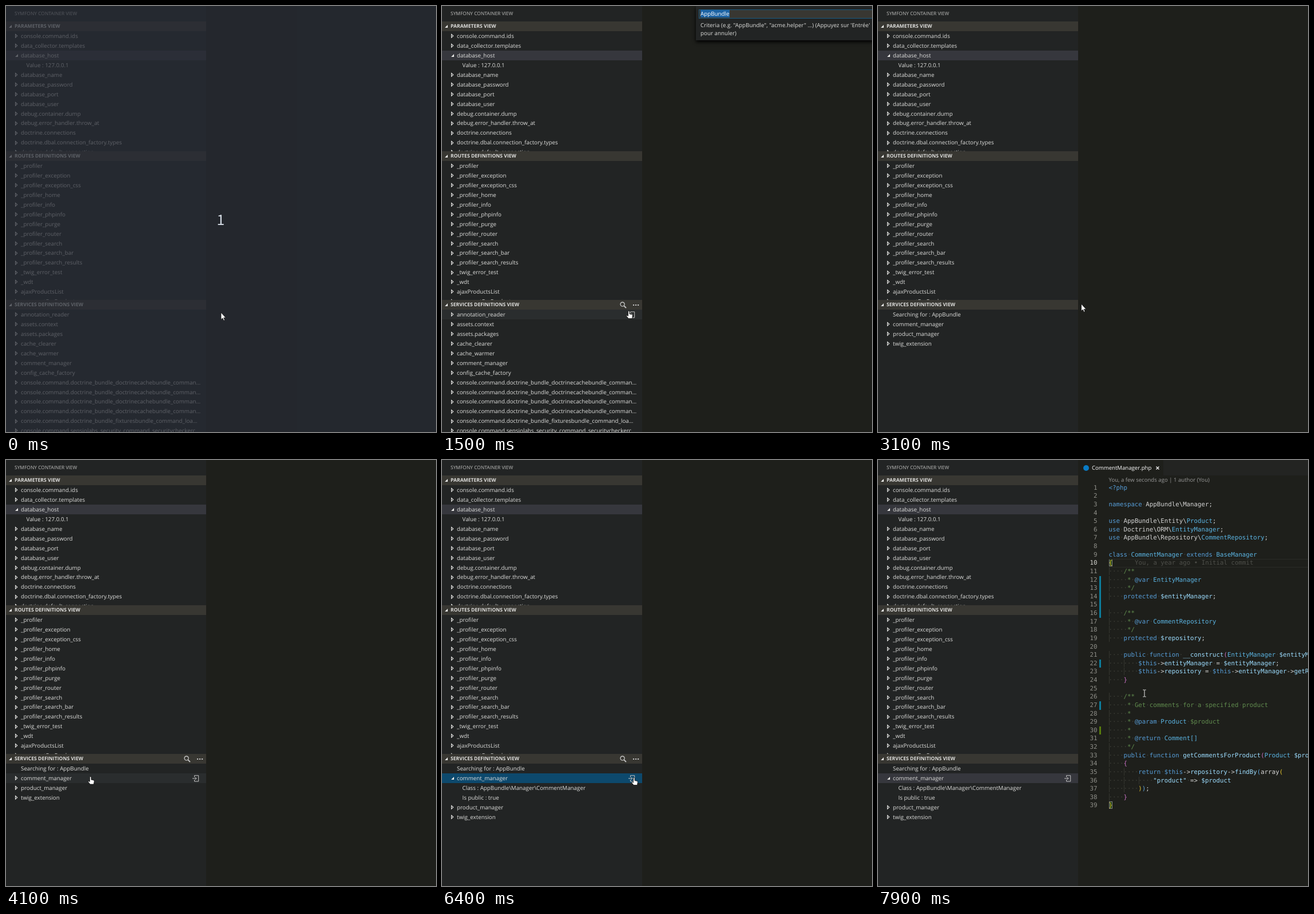
Animation, 752 px wide and 745 px high, one loop 8000 ms. Source, as an HTML page:

```html
<!DOCTYPE html>
<html lang="en">
<head>
<meta charset="utf-8">
<title>Container view</title>
<style>
html, body { margin: 0; width: 100%; height: 100%; overflow: hidden; background: #1e1f1b; }
body { position: relative; font: 9.8px "Open Sans", "Noto Sans", sans-serif; color: #dededc; text-rendering: geometricPrecision; white-space: pre; }
body > *, .abs { position: absolute; }
svg { position: absolute; overflow: visible; }
#side { left: 0; top: 0; width: 349.5px; height: 745px; background: #222424; overflow: hidden; }
#title { left: 15px; top: 6px; font-size: 8.45px; line-height: 15px; color: #bebebc; }
.sec { position: absolute; left: 0; width: 100%; overflow: hidden; }
.head { position: relative; height: 17px; line-height: 17px; padding-left: 15px; background: #383732; font-size: 8.63px; font-weight: 700; }
.row { position: relative; height: 16.94px; line-height: 17.9px; padding-left: 26px; }
.child { padding-left: 35.5px; }
.hover { background: #2a2d2e; }
.sel { background: #36373d; }
.focus { background: #0d496d; }
#bar { left: 0; top: 25px; width: 8px; height: 3px; background: #0e70c0; }
#ask { left: 444px; top: 0; width: 320px; height: 60px; background: #222424; box-shadow: 0 3px 6px #000; }
#ask .field { left: 5px; top: 6px; width: 310px; height: 16px; line-height: 14px; background: #383732; border: 1px solid #1b5a80; box-sizing: border-box; }
#ask .field span { margin-left: 2px; background: #1d64a5; color: #fff; display: inline-block; height: 13px; line-height: 14px; }
#ask .note { left: 8px; top: 27px; line-height: 13.8px; }
#tip { left: 144px; top: 603px; width: 85.5px; height: 21px; line-height: 21px; text-indent: 6px; background: #000; color: #fff; font-size: 11.5px; }
#edit { left: 349.5px; top: 0; width: 403px; height: 745px; overflow: hidden; background: #1e1f1b; }
#tabs { left: 0; top: 0; width: 100%; height: 27px; background: #232422; }
#tab { left: 0; top: 0; width: 149.5px; height: 27px; line-height: 28px; background: #1e1f1b; color: #fff; font-size: 9.6px; text-indent: 24.5px; }
#dot { left: 9px; top: 9px; width: 10px; height: 10px; border-radius: 50%; background: #0a7bc4; }
#lens { left: 54px; top: 28px; line-height: 14px; font-size: 9.6px; color: #999; }
#code { left: 0; top: 41.7px; width: 100%; font: 10.78px "DejaVu Sans Mono", monospace; color: #d4d4d4; }
.line { position: relative; height: 14.63px; line-height: 14.63px; padding-left: 54px; }
.num { position: absolute; right: 369px; color: #90908a; }
.cur .num { color: #d6d6d0; }
.git { position: absolute; left: 37.5px; top: 0; width: 3px; height: 100%; background: #0c7d9d; }
.git.add { background: #587c0c; }
.guide { background: repeating-linear-gradient(90deg, #34352f 0 1px, transparent 1px 4ch); }
.line i { font-style: normal; color: #41423b; }
.cur::before { content: ""; position: absolute; left: 54px; right: 0; top: 0; bottom: 0; border: solid #2a2b27; border-width: 1px 0; box-sizing: border-box; }
.pair { box-shadow: inset 0 0 0 1px #84847c; background: #173a17; }
.blame { position: absolute; left: 99.5px; color: #4e4f4a; }
.k { color: #569cd6 } .t { color: #5bb4e2 } .v { color: #9cdcfe } .c { color: #608b4e }
.b0 { color: #e6c62c } .b1 { color: #c872c4 } .b2 { color: #5fa8e0 }
#veil { inset: 0; background: rgba(39, 44, 54, .7); }
#veil div { position: absolute; left: 0; top: 353px; width: 751px; text-align: center; font: 25px/40px "Noto Sans CJK JP", "Noto Sans CJK SC", "DejaVu Sans", sans-serif; color: #d3dae3; }
#mouse { left: 0; top: 0; width: 1px; height: 1px; }
#mouse svg { left: 0; top: 0; }
</style>
</head>
<body>
<div id="side">
  <div id="title" class="abs">SYMFONY CONTAINER VIEW</div>
  <div id="bar" class="abs"></div>
</div>
<div id="edit">
  <div id="tabs" class="abs"></div>
  <div id="tab" class="abs">CommentManager.php<div id="dot" class="abs"></div><svg style="left:136.5px;top:11px" width="6" height="6"><path d="M.5 .5 5.5 5.5M5.5 .5 .5 5.5" stroke="#e8e8e8" stroke-width="1.5"/></svg></div>
  <div id="lens" class="abs">You, a few seconds ago | 1 author (You)</div>
  <div id="code" class="abs"></div>
</div>
<div id="ask"><div class="abs field"><span>AppBundle</span></div><div class="abs note">Criteria (e.g. "AppBundle", "acme.helper" ...) (Appuyez sur 'Entrée'
pour annuler)</div></div>
<div id="tip">Is public : true</div>
<div id="veil"><div>1</div></div>
<div id="mouse">
  <svg id="arrow" width="9" height="15"><path d="M0 0V12.4L2.8 9.9 4.7 14.2 6.6 13.4 4.8 9.2H8.4Z" fill="#fff" stroke="#111" stroke-width=".8"/></svg>
  <svg id="hand" width="12" height="15"><path d="M-1 0Q.3-1.6 1.5 0V4.6L5.6 5.4Q7 5.8 6.8 7.4L6 12.6H-.2L-3.7 8.6Q-4.2 7-2.6 7L-1 8.2Z" fill="#fff" stroke="#111" stroke-width=".8"/></svg>
  <svg id="beam" width="6" height="13"><path d="M-2.6-6H-.6L0-5.4 .6-6H2.6M0-5.4V5.4M-2.6 6H-.6L0 5.4 .6 6H2.6" fill="none" stroke="#eee"/></svg>
</div>
<script>
const $ = id => document.getElementById(id);
const words = s => s.trim().split(/\s+/);
const ROW = 16.94, LINE = 14.63, LOOP = 8000;

const closed = '<svg style="left:16px;top:5.2px" width="5" height="7"><path d="M.5.4 3.7 3.3 .5 6.2Z" fill="none" stroke="#e8e8e6" stroke-width="1.1"/></svg>';
const opened = x => `<svg style="left:${x}px;top:5.7px" width="5" height="5"><path d="M5 0V5H0Z" fill="#e8e8e6"/></svg>`;
const goTo = '<svg style="left:325.5px;top:3px" width="12" height="12"><path d="M3.5 3.6V.8H10.7V11H3.5V8.2M0 5.9H7M4.8 3.6 7.1 5.9 4.8 8.2" fill="none" stroke="#c5c5c5"/></svg>';
const tools = '<svg id="tools" style="left:311px;top:2.5px" width="34" height="12"><circle cx="4.6" cy="4.6" r="3.6" fill="none" stroke="#c5c5c5" stroke-width="1.3"/><path d="M7.3 7.3 11 11" stroke="#c5c5c5" stroke-width="1.8"/><path d="M23 6h2.2M27 6h2.2M31 6h2.2" stroke="#c5c5c5" stroke-width="2.2"/></svg>';

const item = (text, cls = '', mark = closed) => `<div class="row ${cls}">${mark}${text}</div>`;
const child = (text, cls = '') => item(text, 'child ' + cls, '');

function section(name, top, height, body, extra = '') {
  $('side').insertAdjacentHTML('beforeend',
    `<div class="sec" style="top:${top}px;height:${height}px"><div class="head">${opened(5)}${name}${extra}</div><div>${body}</div></div>`);
  return $('side').lastElementChild.lastElementChild;
}

const params = words(`console.command.ids data_collector.templates database_host database_name database_password
  database_port database_user debug.container.dump debug.error_handler.throw_at doctrine.connections
  doctrine.dbal.connection_factory.types doctrine.default_connection`);
const routes = words(`_profiler _profiler_exception _profiler_exception_css _profiler_home _profiler_info _profiler_phpinfo
  _profiler_purge _profiler_router _profiler_search _profiler_search_bar _profiler_search_results _twig_error_test
  _wdt ajaxProductsList commentForProduct`);
const cached = 'console.command.doctrine_bundle_doctrinecachebundle_comman… ';
const services = words(`annotation_reader assets.context assets.packages cache_clearer cache_warmer comment_manager
  config_cache_factory ${cached.repeat(4)} console.command.doctrine_bundle_fixturesbundle_command_loa…
  console.command.sensiolabs_security_command_securitycheckerc`);

section('PARAMETERS VIEW', 27, 227, params.map(p => p === 'database_host'
  ? item(p, 'sel', opened(15.5)) + child('Value : 127.0.0.1') : item(p)).join(''));
section('ROUTES DEFINITIONS VIEW', 254, 260, routes.map(r => item(r)).join(''));
const list = section('SERVICES DEFINITIONS VIEW', 514, 231, '', tools);

const source = String.raw`<?php

namespace AppBundle\Manager;

use AppBundle\Entity\Product;
use Doctrine\ORM\EntityManager;
use AppBundle\Repository\CommentRepository;

class CommentManager extends BaseManager
{
    /**
     * @var EntityManager
     */
    protected $entityManager;

    /**
     * @var CommentRepository
     */
    protected $repository;

    public function __construct(EntityManager $entityManager) {
        $this->entityManager = $entityManager;
        $this->repository = $this->entityManager->getRepository(Comment);
    }

    /**
     * Get comments for a specified product
     *
     * @param Product $product
     *
     * @return Comment[]
     */
    public function getCommentsForProduct(Product $product)
    {
        return $this->repository->findBy(array(
            "product" => $product
        ));
    }
}`.split('\n');

let depth = 0;
const esc = s => s.replace(/</g, '&lt;').replace(/>/g, '&gt;');
const span = (cls, s) => `<span class="${cls}">${esc(s)}</span>`;
const dots = s => s.replace(/ /g, '\u0001');
const token = /(<\?php|\$this|\b(?:use|namespace|class|extends|protected|public|function|return)\b)|(\b(?:Product|EntityManager|CommentRepository|CommentManager|BaseManager|Comment)\b)|(\$\w+|"\w+"|\b(?:__construct|getCommentsForProduct|entityManager|repository|findBy|getRepository)\b)|([{(])|([})])|[^]/g;

function paint(text, pair) {
  if (/^(\/\*|\*)/.test(text))
    return span('c', text).replace(/(@\w+)( [A-Z]\w+(\[\])?)?/, (m, tag, type) =>
      span('k', tag) + (type ? span('t', type) : ''));
  return text.replace(token, (m, key, type, name, open, close) => {
    if (key) return span('k', m);
    if (type) return span('t', m);
    if (name) return span('v', m);
    if (open) return span(`b${depth++ % 3}${pair}`, m);
    if (close) return span(`b${--depth % 3}${pair}`, m);
    return esc(m);
  });
}

const changed = [12, 13, 14, 15, 16, 22, 27];
$('code').innerHTML = source.map((raw, i) => {
  const n = i + 1, text = raw.trimStart(), pad = raw.length - text.length, full = pad - pad % 4;
  const body = paint(text, n === 10 || n === 39 ? ' pair' : '')
    .replace(/>[^<]*|^[^<]+/g, dots).replace(/\u0001/g, '<i>·</i>');
  const git = changed.includes(n) ? '<b class="git"></b>' : n === 30 ? '<b class="git add"></b>' : '';
  const note = n === 10 ? '<span class="blame">You, a year ago • Initial commit</span>' : '';
  return `<div class="line${n === 10 ? ' cur' : ''}"><span class="num">${n}</span>${git}` +
    `<span class="guide"><i>${'·'.repeat(full)}</i></span><i>${'·'.repeat(pad - full)}</i>${body}${note}</div>`;
}).join('');

// time, x, y of the pointer
const path = [
  [0, 376, 536], [100, 376, 536], [300, 377, 528], [500, 377, 528], [600, 366, 527], [800, 347, 527],
  [900, 347, 527], [1100, 320, 527], [1400, 320, 527], [1600, 333, 541], [1800, 346, 533], [1900, 346, 533],
  [2000, 348, 524], [2100, 348, 524], [2200, 355.5, 521], [3500, 355.5, 521], [3600, 322, 525], [3700, 285, 530],
  [3800, 285, 530], [3900, 232, 538], [4100, 147.5, 554.5], [4600, 147.5, 554.5], [4700, 146, 557], [4800, 146, 557],
  [5100, 136.5, 591], [5500, 136.5, 591], [5600, 200, 584], [5700, 285, 568], [5900, 328, 558], [6200, 335.5, 556],
  [6900, 335.5, 556], [7000, 480, 470], [7100, 565, 424], [7300, 565, 424], [7900, 466, 408], [8000, 466, 408]
];

function pointer(t) {
  const i = path.findIndex(p => p[0] > t), [t0, x0, y0] = path[i - 1], [t1, x1, y1] = path[i];
  const k = (t - t0) / (t1 - t0);
  return [x0 + (x1 - x0) * k, y0 + (y1 - y0) * k];
}

function fillList(t, row) {
  const hov = i => i === row ? 'hover' : '';
  const service = (name, i) => item(name + (i === row ? goTo : ''), hov(i));
  if (t < 3100) return services.map(service).join('');
  const open = t >= 4400, pick = t >= 6600 ? 'sel' : t >= 4300 ? 'focus' : hov(1);
  return item('Searching for : AppBundle', hov(0), '') +
    item('comment_manager' + (pick ? goTo : ''), pick, open ? opened(15.5) : closed) +
    (open ? child('Class : AppBundle\\Manager\\CommentManager', hov(2)) + child('Is public : true', hov(3)) : '') +
    service('product_manager', open ? 4 : 2) + service('twig_extension', open ? 5 : 3);
}

const show = (el, on) => { el.style.visibility = on ? 'visible' : 'hidden'; };
const within = (t, a, b) => t >= a && t < b;

function draw(t) {
  const [x, y] = pointer(t);
  const over = x < 349.5 && y > 514;
  const kind = over ? 'hand' : t >= 7000 ? 'beam' : 'arrow';
  for (const id of ['arrow', 'hand', 'beam']) show($(id), id === kind);
  $('mouse').style.transform = `translate(${x}px, ${y}px)`;
  list.innerHTML = fillList(t, over && y > 531 ? Math.floor((y - 531) / ROW) : -1);
  show($('tools'), over);
  show($('veil'), t < 100);
  show($('ask'), within(t, 1500, 2700));
  show($('bar'), within(t, 2900, 3100) || within(t, 4300, 4400));
  show($('tip'), within(t, 5300, 5600));
  $('edit').style.display = t >= 6600 ? 'block' : 'none';
  show($('lens'), t >= 7400);
  $('code').style.transform = `translateY(${t < 7000 ? -LINE : 0}px)`;
  show(document.querySelector('.blame'), t >= 6700);
  document.querySelectorAll('.git').forEach(g => show(g, t >= 7000));
}

let last = -1;
const start = performance.now();
function tick() {
  const t = Math.floor((performance.now() - start) % LOOP / 100) * 100;
  if (t !== last) draw(last = t);
  requestAnimationFrame(tick);
}
tick();
</script>
</body>
</html>
```
